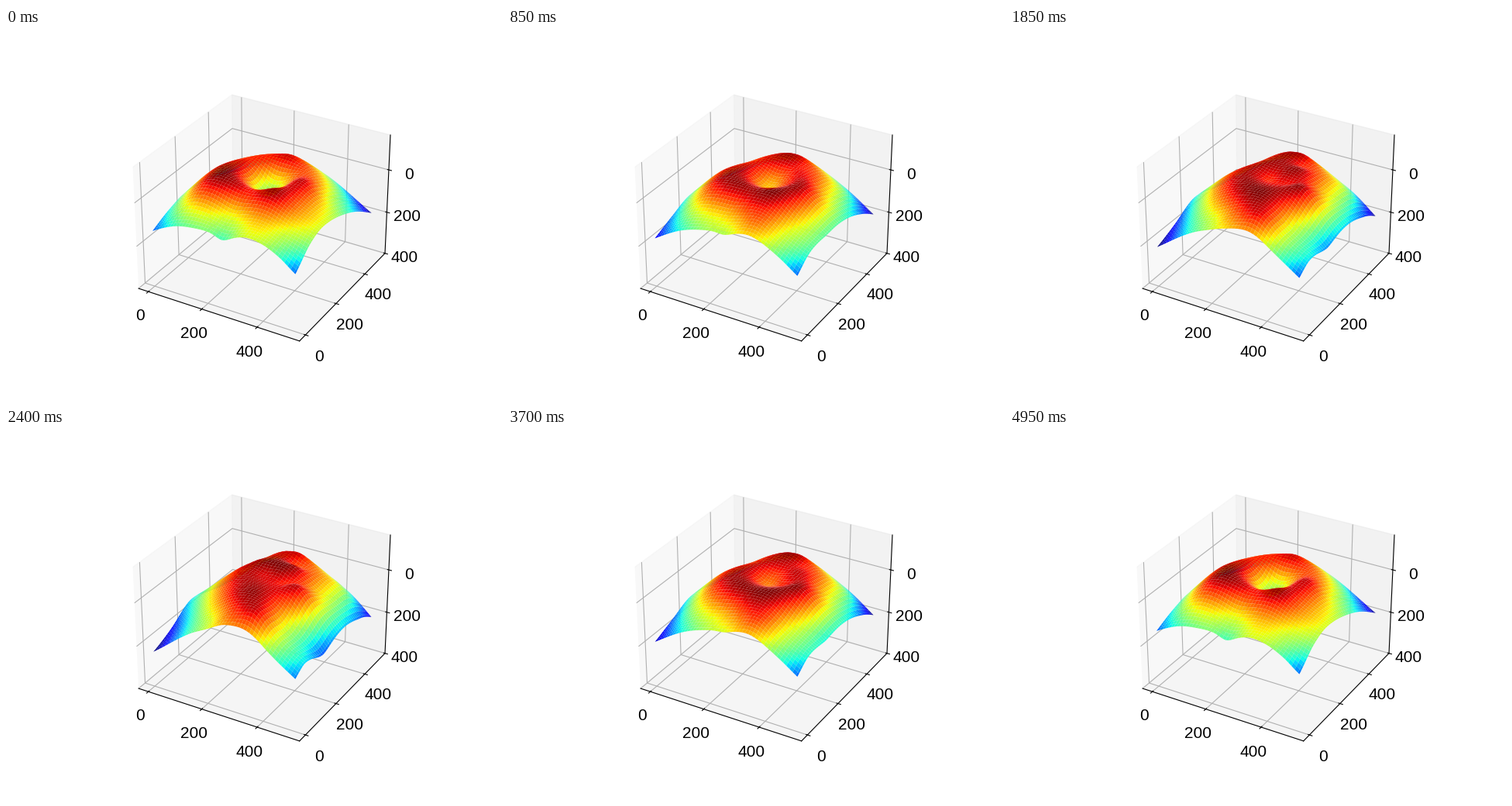
A matplotlib script that plays this animation: 640 by 480 pixels, repeating every 5000 ms.

```python
import numpy as np
import matplotlib.pyplot as plt
from matplotlib.animation import FuncAnimation

plt.rcParams["font.family"] = "Liberation Sans"
plt.rcParams["font.size"] = 15

SIZE = 511
HALF = SIZE / 2
FRAMES = 100
FULL_STEP = 39  # step at which the second relief is reached

# Control points (x, y, height), measured from the middle of the sheet.
RING = [
    (-256, -256, -139), (256, -256, -137), (256, 256, -194), (-256, 256, -175),
    (-179, -256, -89), (-108, -256, -69), (-39, -256, -68), (0, -256, -84),
    (39, -256, -60), (85, -256, -40), (153, -256, -54), (207, -256, -90),
    (256, -176, -70), (256, -103, -40), (256, 0, -53), (256, 103, -94),
    (-256, -138, -96), (-256, 0, -92), (-256, 128, -125),
    (-128, 256, -90), (0, 256, -50), (128, 256, -98),
    (-133, -69, 57), (-147, -5, 50), (-111, 54, 40), (-79, 122, 32),
    (0, 160, 44), (112, 43, 45), (76, -76, 57), (-43, -84, 44),
    (-10, 65, -52), (0, 10, -55), (-27, -159, -18), (76, -146, 12),
    (147, -53, 16), (165, -180, -38), (-150, -143, 15), (173, 68, -18),
    (155, 189, -62),
]
SWIRL = [
    (-256, -256, -218), (256, -256, -155), (256, 256, -210), (-256, 256, -190),
    (-179, -256, -145), (-108, -256, -87), (-39, -256, -47), (39, -256, -15),
    (85, -256, -15), (153, -256, -65), (207, -256, -113),
    (256, -200, -122), (256, -152, -124), (256, -78, -145), (256, 0, -127),
    (256, 78, -127), (256, 159, -155),
    (-256, -138, -172), (-256, -47, -128), (-256, 82, -155),
    (-128, 256, -80), (0, 256, -40), (128, 256, -95),
    (-152, -3, -5), (-93, 25, 40), (-62, 68, 46), (-24, 176, 45),
    (24, 185, 42), (35, 148, 20), (60, 95, 47), (120, -6, 48),
    (35, -114, 54), (-45, -40, 46), (-5, 20, 22), (35, 35, 40), (68, 15, 26),
    (43, -217, 14), (84, -205, 32), (109, -108, 15), (159, -147, -48),
    (-118, -140, -30), (-60, -202, -38), (-44, -131, 28),
    (140, 81, -12), (173, 181, -54), (-150, 110, -55),
]


def kernel(x, y, px, py):
    d2 = (x[:, None] - px) ** 2 + (y[:, None] - py) ** 2
    return d2 * np.log(d2 + 1e-12)


def relief(points, x, y):
    """Thin plate spline through the control points."""
    px, py, pz = np.array(points, float).T
    px, py = px / HALF, py / HALF
    n = len(pz)
    poly = np.column_stack([np.ones(n), px, py])
    system = np.zeros((n + 3, n + 3))
    system[:n, :n] = kernel(px, py, px, py)
    system[:n, n:] = poly
    system[n:, :n] = poly.T
    w = np.linalg.solve(system, np.append(pz, np.zeros(3)))
    u, v = x.ravel() / HALF - 1, y.ravel() / HALF - 1
    z = kernel(u, v, px, py) @ w[:n] + w[n] + w[n + 1] * u + w[n + 2] * v
    return z.reshape(x.shape)


def quads(a):
    """The four corner values of every cell."""
    corners = [a[:-1, :-1], a[:-1, 1:], a[1:, 1:], a[1:, :-1]]
    return np.stack([c.ravel() for c in corners], axis=1)


steps = np.append(np.arange(0, SIZE, 11), SIZE)
X, Y = np.meshgrid(steps, steps)
start = relief(RING, X, Y)
change = (relief(SWIRL, X, Y) - start) / FULL_STEP
QX, QY = quads(X), quads(Y)

fig = plt.figure(figsize=(6.4, 4.8), dpi=100)
ax = fig.add_subplot(projection="3d")
surface = ax.plot_surface(X, Y, start, cmap="jet")

reach = HALF * 1.1 * 25 / 24
ax.set_xlim(HALF - reach, HALF + reach)
ax.set_ylim(HALF - reach, HALF + reach)
ax.set_zlim(-400, 160)
ax.set_xticks([0, 200, 400])
ax.set_yticks([0, 200, 400])
ax.set_zticks([-400, -200, 0], labels=["400", "200", "0"])


def update(i):
    k = min(i, FRAMES - 1 - i)
    qz = quads(start + change * k)
    level = qz.mean(axis=1)
    surface.set_verts(np.stack([QX, QY, qz], axis=2))
    surface.set_array(level)
    surface.set_clim(level.min(), level.max())
    return [surface]


anim = FuncAnimation(fig, update, frames=FRAMES, interval=50,
                     init_func=lambda: update(0), repeat=True, blit=False)
plt.show()
```
